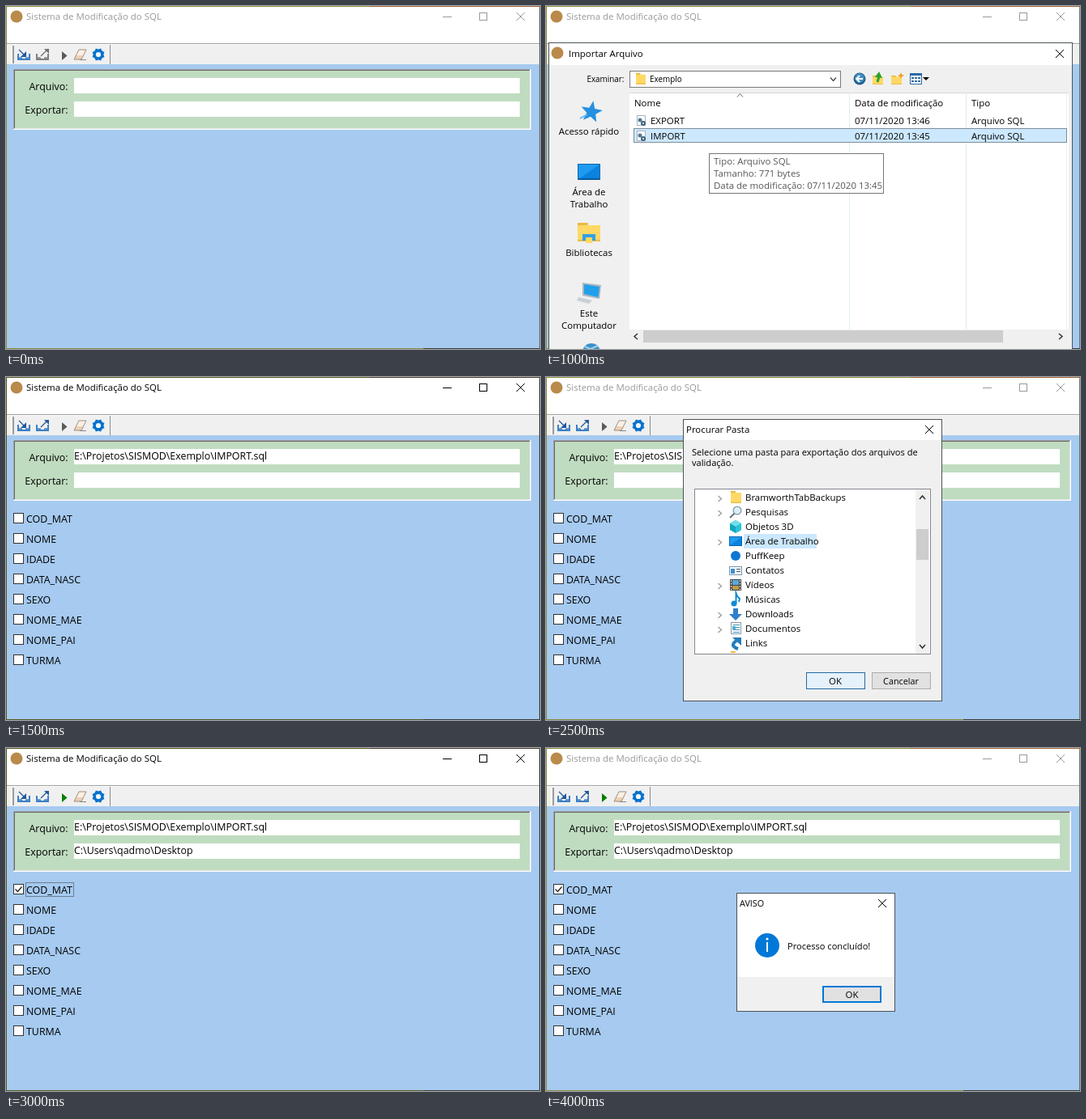
Write an HTML page with a canvas that moves like this. It is 659x424 px and loops after 5 s.

```html
<!DOCTYPE html>
<html lang="pt-BR">
<head>
<meta charset="utf-8">
<title>Sistema de Modificação do SQL</title>
<style>
html, body { margin: 0; width: 100%; height: 100%; overflow: hidden; }
canvas { display: block; }
</style>
</head>
<body>
<canvas id="stage" width="659" height="424"></canvas>
<script>
const ctx = document.getElementById('stage').getContext('2d');
const LOOP = 5000;
const SKY = '#a6caf0', MINT = '#c0dcc0', FACE = '#f0f0f0', PICK = '#cce8ff', BLUE = '#0078d7';
const UI = 11.45, FORM = 12.4, SMALL = 9.9;
const FIELDS = ['COD_MAT', 'NOME', 'IDADE', 'DATA_NASC', 'SEXO', 'NOME_MAE', 'NOME_PAI', 'TURMA'];

function rect(x, y, w, h, color) {
  ctx.fillStyle = color;
  ctx.fillRect(x, y, w, h);
}

function box(x, y, w, h, fill, border, line = 1) {
  rect(x, y, w, h, border);
  rect(x + line, y + line, w - 2 * line, h - 2 * line, fill);
}

function label(str, x, y, size = UI, color = '#000', align = 'left') {
  ctx.font = `${size}px "Open Sans", "Noto Sans", sans-serif`;
  ctx.textAlign = align;
  ctx.fillStyle = color;
  ctx.fillText(str, x, y);
}

function trace(points, closed) {
  ctx.beginPath();
  for (let i = 0; i < points.length; i += 2) ctx.lineTo(points[i], points[i + 1]);
  if (closed) ctx.closePath();
}

function line(points, color, width = 1) {
  trace(points);
  ctx.strokeStyle = color;
  ctx.lineWidth = width;
  ctx.stroke();
}

function poly(points, color) {
  trace(points, true);
  ctx.fillStyle = color;
  ctx.fill();
}

function disc(x, y, r, color) {
  ctx.beginPath();
  ctx.arc(x, y, r, 0, Math.PI * 2);
  ctx.fillStyle = color;
  ctx.fill();
}

function cross(x, y, color) {
  line([x - 5, y - 5, x + 5, y + 5], color);
  line([x + 5, y - 5, x - 5, y + 5], color);
}

function dotted(x, y, w, h) {
  ctx.setLineDash([1, 1]);
  ctx.strokeStyle = '#333';
  ctx.lineWidth = 1;
  ctx.strokeRect(x + .5, y + .5, w - 1, h - 1);
  ctx.setLineDash([]);
}

function chevron(x, y, dx, dy, color = '#555', width = 1) {
  const r = 3.5;
  line(dx ? [x - dx * 2, y - r, x + dx * 2, y, x - dx * 2, y + r]
          : [x - r, y - dy * 2, x, y + dy * 2, x + r, y - dy * 2], color, width);
}

function star(x, y, r, spikes, inner, color, turn = -Math.PI / 2) {
  const points = [];
  for (let i = 0; i < spikes * 2; i++) {
    const a = turn + i * Math.PI / spikes, d = i % 2 ? r * inner : r;
    points.push(x + d * Math.cos(a), y + d * Math.sin(a));
  }
  poly(points, color);
}

function folder(x, y, w, h) {
  rect(x, y, w * .45, h, '#e9b93d');
  rect(x, y + h * .13, w, h * .87, '#ffd866');
  rect(x, y + h * .9, w, h * .1, '#eebf4a');
}

function monitor(x, y, w, h) {
  box(x, y, w, h, '#1e9bf0', '#0869b0');
  poly([x + 1, y + h - 1, x + w - 1, y + 1, x + w - 1, y + h - 1], '#0b82de');
}

function tooltip(str, x, y, right) {
  box(x, y, right - x, 20, '#fff', '#767676');
  label(str, x + 6, y + 14, UI, '#575757');
}

function trayIcon(x, out, enabled) {
  const tray = enabled ? '#3c7fc4' : '#808080', arrow = enabled ? '#235a9c' : '#707070';
  line([x + 1, 59, x + 1, 66, x + 15, 66, x + 15, 59], tray, 2);
  line([x + 1, 64, x + 5, 64, x + 6, 66, x + 10, 66, x + 11, 64, x + 15, 64], tray, 1.5);
  if (out) {
    line([x + 6, 62, x + 13, 55], arrow, 1.3);
    poly([x + 10, 53, x + 16, 53, x + 16, 59], arrow);
  } else {
    line([x + 2, 54, x + 8, 60], arrow, 1.3);
    poly([x + 11, 56, x + 11, 63, x + 4, 63], arrow);
  }
}

function toolbar(s) {
  rect(1, 46, 657, 1, '#a0a0a0');
  rect(1, 47, 657, 25, FACE);
  rect(1, 47, 657, 1, '#fff');
  rect(6, 49, 1, 22, '#fff');
  rect(8, 49, 1, 22, '#a0a0a0');
  rect(9, 49, 1, 22, '#999');
  rect(128, 48, 1, 24, '#8c8c8c');
  if (s.hover) box(11 + 23 * s.hover.button, 49, 23, 23, '#e5f3ff', '#cce8ff');
  trayIcon(14, false, true);
  trayIcon(37, true, s.loaded);
  poly([69, 56, 69, 67, 75.5, 61.5], s.ready ? '#008000' : '#5b5b5b');
  poly([90, 54, 99, 54, 93, 66, 84, 66], '#fbf0e4');
  poly([86.5, 61, 95.5, 61, 93, 66, 84, 66], '#ecd0b5');
  line([90, 54, 99, 54, 93, 66, 84, 66, 90, 54], '#a08d80');
  rect(91, 66, 8, 1, '#888');
  star(114, 60, 8, 8, .8, '#0873cf', Math.PI / 8);
  disc(114, 60, 5.8, '#0873cf');
  disc(114, 60, 3.1, '#f4f8fc');
}

function mainWindow(s) {
  const ink = s.active ? '#000' : '#999';
  rect(0, 0, 659, 424, s.active ? '#55581e' : '#8b8d3c');
  rect(450, 0, 209, 1, s.active ? '#49392c' : '#a0613c');
  rect(658, 4, 1, 420, s.active ? '#34454c' : '#607b86');
  rect(515, 423, 144, 1, '#3c3c38');
  rect(1, 1, 657, 45, '#fff');
  rect(1, 72, 657, 351, SKY);
  disc(13, 13, 7.5, '#b98a4a');
  label('Sistema de Modificação do SQL', 25, 17, UI, ink);
  rect(539, 13, 11, 1, ink);
  box(584, 8, 10, 10, '#fff', ink);
  cross(635, 13, ink);
  toolbar(s);

  rect(9, 78, 639, 75, '#fff');
  rect(9, 78, 638, 74, '#a0a0a0');
  rect(10, 79, 637, 73, '#e3e3e3');
  rect(10, 79, 636, 72, '#696969');
  rect(11, 80, 635, 71, MINT);
  label('Arquivo:', 76.5, 104, FORM, '#000', 'right');
  label('Exportar:', 76.5, 133, FORM, '#000', 'right');
  rect(84, 89, 550, 19, '#fff');
  rect(84, 118, 550, 19, '#fff');
  if (s.loaded) {
    label('E:\\Projetos\\SISMOD\\Exemplo\\IMPORT.sql', 84, 102, FORM);
    FIELDS.forEach((name, i) => {
      box(9, 168 + 25 * i, 13, 13, '#fff', '#333');
      label(name, 25, 180 + 25 * i, FORM);
    });
  }
  if (s.ready) {
    label('C:\\Users\\qadmo\\Desktop', 84, 131, FORM);
    line([11.5, 174.5, 14.5, 177.5, 19.5, 171.5], '#222', 1.3);
    if (s.active) dotted(24, 166, 60, 18);
  }
  if (s.hover) tooltip(s.hover.text, s.hover.x, s.hover.y, s.hover.right);
}

function sidebar() {
  const place = (str, y) => label(str, 53, y, UI, '#000', 'center');
  star(56, 131, 14, 5, .42, '#2490e0', -1.4);
  line([42, 139, 51, 134], '#65b7ef', 2);
  place('Acesso rápido', 159);
  monitor(39, 195, 28, 20);
  rect(40, 213, 26, 2, '#075a9c');
  place('Área de', 234);
  place('Trabalho', 249);
  folder(39, 268, 28, 23);
  rect(45, 282, 16, 8, '#35a0e5');
  rect(49, 286, 8, 7, '#ffd866');
  place('Bibliotecas', 309);
  poly([45, 342, 68, 345, 66, 362, 45, 358], '#aab7c0');
  poly([47, 344, 66, 347, 64.5, 360, 47, 356], '#22a0ec');
  poly([40, 360, 57, 364, 53, 368, 38, 364], '#c5d0d8');
  place('Este', 384);
  place('Computador', 399);
  disc(56, 428, 11, '#3d90c8');
  line([48, 421, 55, 424, 64, 420], '#9bd4ec', 2);
}

function fileRow(name, when, y) {
  box(112, y - 11, 11, 13, '#fff', '#a9b3ba');
  disc(116, y - 5, 2.5, '#54788f');
  disc(120, y - 1, 3, '#3d627d');
  disc(120, y - 1, 1, '#fff');
  label(name, 129, y);
  label(when, 381, y);
  label('Arquivo SQL', 525, y);
}

function importDialog() {
  box(3, 45, 647, 390, FACE, '#4c5358');
  rect(4, 46, 645, 27, '#fff');
  disc(14, 58, 7.5, '#b98a4a');
  label('Importar Arquivo', 28, 63);
  cross(634, 59, '#000');
  label('Examinar:', 96.5, 94, SMALL, '#000', 'right');
  box(103, 80, 261, 21, '#fff', '#7a7a7a');
  folder(111, 83, 12, 14);
  label('Exemplo', 128, 94, SMALL);
  chevron(354.5, 90.5, 0, 1, '#444', 1.2);

  disc(387, 90, 7.5, '#24608f');
  disc(387, 89, 5.8, '#3f8fc4');
  line([391, 90, 383.5, 90], '#fff', 2);
  line([387, 86, 383, 90, 387, 94], '#fff', 2);
  folder(403, 86, 13, 11);
  line([409, 94, 411, 87], '#28a428', 3);
  poly([406, 88, 411, 81, 415, 89], '#28a428');
  folder(426, 86, 13, 11);
  star(438, 86, 4, 4, .4, '#f39b22');
  box(449, 83, 15, 14, '#fff', '#2869a8');
  rect(449, 83, 15, 3, '#2869a8');
  for (let i = 0; i < 6; i++) rect(451 + i % 3 * 4, 88 + (i / 3 | 0) * 4, 3, 2, '#396c9d');
  poly([465, 88, 473, 88, 469, 92], '#000');
  sidebar();

  rect(103, 107, 542, 310, '#fff');
  rect(103, 107, 542, 1, '#d9d9d9');
  rect(374, 108, 1, 292, '#e0edf6');
  rect(518, 108, 1, 292, '#e0edf6');
  rect(642, 108, 1, 292, '#e8f0f5');
  chevron(239.5, 110.5, 0, -1, '#666');
  label('Nome', 109, 124);
  label('Data de modificação', 381, 124);
  label('Tipo', 525, 124);
  rect(108, 151, 535, 18, PICK);
  dotted(108, 151, 535, 18);
  fileRow('EXPORT', '07/11/2020 13:46', 146);
  fileRow('IMPORT', '07/11/2020 13:45', 165);
  rect(103, 400, 542, 17, FACE);
  rect(120, 401, 444, 15, '#cdcdcd');
  chevron(111, 408.5, -1, 0, '#333', 1.5);
  chevron(635, 408.5, 1, 0, '#333', 1.5);

  box(201, 182, 216, 50, '#fff', '#767676');
  ['Tipo: Arquivo SQL', 'Tamanho: 771 bytes', 'Data de modificação: 07/11/2020 13:45']
    .forEach((str, i) => label(str, 207, 196 + 15 * i, UI, '#575757'));
}

// Each icon is drawn around the centre of its tree row.
const icons = {
  folder: (x, y) => folder(x - 6, y - 8, 13, 15),
  search(x, y) {
    line([x - 7, y + 7, x - 1, y + 1], '#687782', 2);
    disc(x + 2, y - 2, 5.5, '#8499a6');
    disc(x + 2, y - 2, 4.2, '#d9f0fb');
  },
  cube(x, y) {
    poly([x, y - 8, x + 7, y - 4, x + 7, y + 4, x, y + 8, x - 7, y + 4, x - 7, y - 4], '#12a5bd');
    poly([x, y - 8, x + 7, y - 4, x, y, x - 7, y - 4], '#6fe0eb');
    poly([x, y, x + 7, y - 4, x + 7, y + 4, x, y + 8], '#28c4d5');
  },
  desktop: (x, y) => monitor(x - 8, y - 6, 16, 12),
  cloud: (x, y) => disc(x, y, 6, '#0f78d4'),
  card(x, y) {
    box(x - 8, y - 5, 16, 11, '#f5fbff', '#7997ac');
    rect(x - 6, y - 2, 5, 6, '#3b91cf');
    rect(x + 1, y - 2, 5, 1, '#456');
    rect(x + 1, y + 1, 5, 1, '#456');
  },
  film(x, y) {
    rect(x - 7, y - 7, 14, 14, '#444');
    rect(x - 4, y - 6, 8, 6, '#59a9d9');
    rect(x - 4, y + 1, 8, 5, '#c09b47');
    for (let i = 0; i < 4; i++) {
      rect(x - 6, y - 6 + i * 3.5, 1, 2, '#fff');
      rect(x + 5, y - 6 + i * 3.5, 1, 2, '#fff');
    }
  },
  note(x, y) {
    disc(x - 2, y + 5, 3.5, '#118bd5');
    line([x + .5, y + 5, x + .5, y - 8, x + 2, y - 4, x + 5, y - 1, x + 4, y + 3], '#118bd5', 2);
  },
  down: (x, y) => poly([x - 3, y - 7, x + 3, y - 7, x + 3, y, x + 8, y, x, y + 8, x - 8, y, x - 3, y], '#2f80cc'),
  page(x, y) {
    box(x - 6, y - 8, 13, 15, '#fff', '#8a9ba6');
    for (let i = 0; i < 4; i++) rect(x - 3, y - 5 + i * 3, 8, 1, '#3993c4');
    rect(x - 4, y - 3, 4, 4, '#53adcf');
  },
  link(x, y) {
    ctx.beginPath();
    ctx.moveTo(x + 3, y + 7);
    ctx.quadraticCurveTo(x - 8, y + 3, x + 1, y - 3);
    ctx.strokeStyle = '#237ebd';
    ctx.lineWidth = 4;
    ctx.stroke();
    poly([x - 4, y - 7, x + 7, y - 7, x + 7, y + 3], '#237ebd');
  }
};

const TREE = [
  ['BramworthTabBackups', 'folder', true], ['Pesquisas', 'search', true],
  ['Objetos 3D', 'cube'], ['Área de Trabalho', 'desktop', true],
  ['PuffKeep', 'cloud'], ['Contatos', 'card'], ['Vídeos', 'film', true],
  ['Músicas', 'note'], ['Downloads', 'down', true],
  ['Documentos', 'page', true], ['Links', 'link'], ['', 'folder']
];

function folderDialog() {
  box(169, 52, 320, 349, FACE, '#4c5358');
  rect(170, 53, 318, 25, '#fff');
  label('Procurar Pasta', 173, 69);
  cross(473, 65, '#000');
  label('Selecione uma pasta para exportação dos arquivos de', 180, 97, 11.1);
  label('validação.', 180, 110, 11.1);
  box(183, 138, 292, 205, '#fff', '#828790');
  rect(244, 194, 90, 18, PICK);
  ctx.save();
  ctx.beginPath();
  ctx.rect(184, 139, 290, 202);
  ctx.clip();
  TREE.forEach(([name, icon, nested], i) => {
    const y = 149 + 18 * i;
    if (nested) chevron(214.5, y + 1.5, 1, 0, '#999', 1.2);
    icons[icon](234, y);
    label(name, 246, y + 4);
  });
  ctx.restore();
  rect(456, 139, 17, 203, FACE);
  rect(457, 188, 15, 38, '#cdcdcd');
  chevron(464.5, 149, 0, -1, '#333', 1.5);
  chevron(464.5, 333, 0, 1, '#333', 1.5);
  box(321, 365, 73, 21, '#e5f1fb', '#236ba5');
  label('OK', 357, 380, UI, '#000', 'center');
  box(402, 365, 73, 21, '#e1e1e1', '#adadad');
  label('Cancelar', 438, 380, 10.8, '#000', 'center');
}

function noticeDialog() {
  box(235, 179, 196, 147, '#fff', '#4c5358');
  rect(236, 283, 194, 42, FACE);
  label('AVISO', 239, 196, 10.8);
  cross(415, 192, '#000');
  disc(273, 244, 15, BLUE);
  rect(272, 240, 2, 12, '#fff');
  disc(273, 236, 1.6, '#fff');
  label('Processo concluído!', 298, 249, 11.1);
  box(341, 294, 73, 21, '#e1e1e1', BLUE, 2);
  label('OK', 377.5, 309, UI, '#000', 'center');
}

const SCENES = [
  { at: 0 },
  { at: 500, active: true, hover: { button: 0, text: 'Importar Arquivo', x: 22, y: 82, right: 126 } },
  { at: 1000, dialog: importDialog },
  { at: 1500, active: true, loaded: true },
  { at: 2000, active: true, loaded: true,
    hover: { button: 1, text: 'Exportar Arquivo', x: 45, y: 82, right: 148 } },
  { at: 2500, loaded: true, dialog: folderDialog },
  { at: 3000, active: true, loaded: true, ready: true },
  { at: 3500, active: true, loaded: true, ready: true,
    hover: { button: 2, text: 'Executar Arquivo', x: 63, y: 77, right: 165 } },
  { at: 4000, loaded: true, ready: true, dialog: noticeDialog }
];

const start = performance.now();

function frame() {
  const t = (performance.now() - start) % LOOP;
  const scene = SCENES.filter(s => s.at <= t).pop();
  mainWindow(scene);
  if (scene.dialog) scene.dialog();
  requestAnimationFrame(frame);
}
frame();
</script>
</body>
</html>
```
